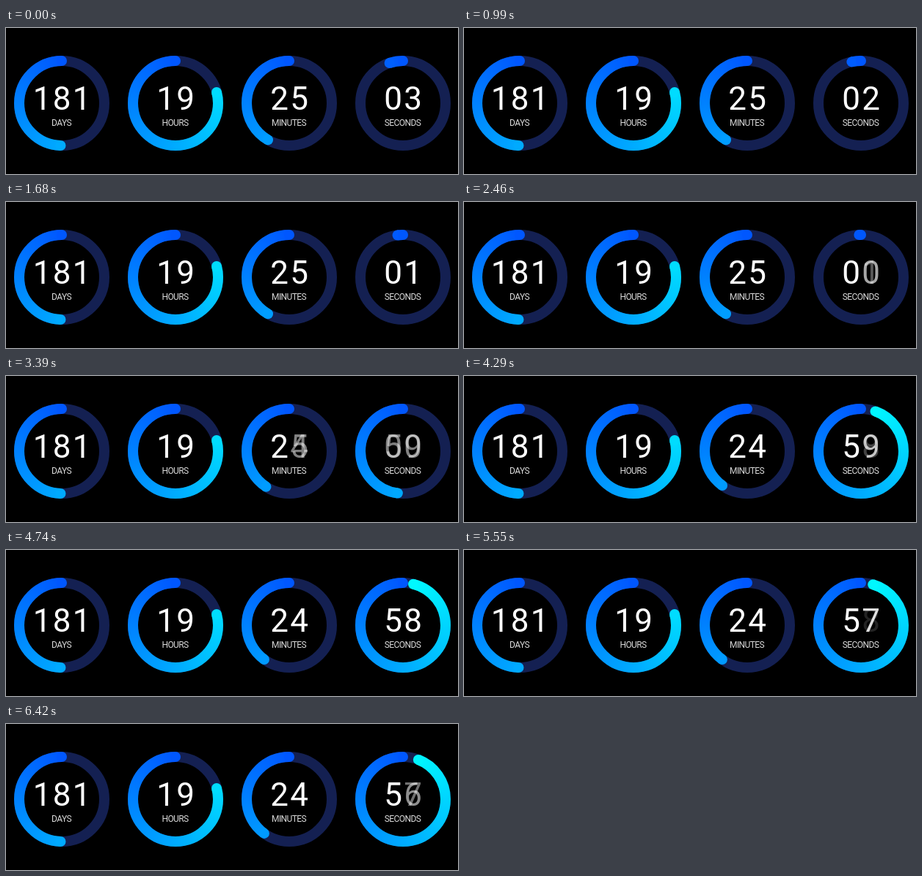
An HTML page with a canvas that plays this animation: 616 by 200 pixels, repeating every 6450 ms.

```html
<!DOCTYPE html>
<html lang="en">
<head>
<meta charset="utf-8">
<title>Countdown</title>
<style>
  html, body { margin: 0; width: 100%; height: 100%; overflow: hidden; background: #000; }
  canvas { display: block; }
</style>
</head>
<body>
<canvas id="stage" width="616" height="200"></canvas>
<script>
const ctx = document.getElementById('stage').getContext('2d');

const LOOP = 6450;
const FIRST_TICK = 170;
const SECOND = 1000;
const START = 25 * 60 + 3;   // minutes and seconds left, in seconds
const CHASE = 3.03 / 1000;   // how fast an arc closes in on its value, per ms
const FADE_DELAY = 10;
const FADE = 430;

const CY = 103;
const RADIUS = 58;
const WIDTH = 14;
const CELL = 27;
const TOP = -Math.PI / 2;
const TAU = Math.PI * 2;

const rings = [
  { x: 76,  label: 'DAYS',    max: 365, pad: 3, value: () => 181 },
  { x: 231, label: 'HOURS',   max: 24,  pad: 2, value: () => 19 },
  { x: 386, label: 'MINUTES', max: 60,  pad: 2, value: n => Math.floor((START - n) / 60) },
  { x: 541, label: 'SECONDS', max: 60,  pad: 2, value: n => (START - n) % 60 }
];

const clamp = v => Math.max(0, Math.min(1, v));
const tickTime = n => FIRST_TICK + (n - 1) * SECOND;
const tickCount = t => Math.max(0, Math.floor((t - FIRST_TICK) / SECOND) + 1);

// Colour along the arc, 0 at the top and 1 after a full turn
const shade = p => `rgb(0, ${Math.round(87 + 168 * p)}, 255)`;

// Every tick adds its own decaying step, so late steps overlap smoothly
function arcLevel(ring, t) {
  let level = ring.value(-1);
  for (let n = 0; n <= tickCount(t); n++) {
    const step = ring.value(n) - ring.value(n - 1);
    level += step * (1 - Math.exp(-CHASE * (t - tickTime(n))));
  }
  return clamp(level / ring.max);
}

function dot(x, y, color) {
  ctx.fillStyle = color;
  ctx.beginPath();
  ctx.arc(x, y, WIDTH / 2, 0, TAU);
  ctx.fill();
}

function drawArc(x, level) {
  ctx.lineWidth = WIDTH;
  ctx.strokeStyle = '#142052';
  ctx.beginPath();
  ctx.arc(x, CY, RADIUS, 0, TAU);
  ctx.stroke();

  const end = TOP - level * TAU;
  const gradient = ctx.createConicGradient(TOP, x, CY);
  gradient.addColorStop(0, shade(1));
  gradient.addColorStop(1, shade(0));
  ctx.strokeStyle = gradient;
  ctx.beginPath();
  ctx.arc(x, CY, RADIUS, TOP, end, true);
  ctx.stroke();

  dot(x + RADIUS * Math.cos(end), CY + RADIUS * Math.sin(end), shade(level));
  dot(x, CY - RADIUS, shade(0));
}

function drawDigit(char, x, alpha) {
  ctx.globalAlpha = alpha;
  ctx.fillText(char, x, 111.5);
  ctx.globalAlpha = 1;
}

function drawDigits(ring, n, mix) {
  const text = k => String(ring.value(k)).padStart(ring.pad, '0');
  const now = text(n);
  const before = text(Math.max(0, n - 1));
  ctx.font = '400 44px Roboto, sans-serif';
  ctx.letterSpacing = '0px';
  ctx.fillStyle = '#fff';
  for (let i = 0; i < now.length; i++) {
    const x = ring.x + (i - (now.length - 1) / 2) * CELL;
    if (now[i] === before[i]) {
      drawDigit(now[i], x, 1);
    } else {
      drawDigit(before[i], x, 1 - mix);
      drawDigit(now[i], x, mix);
    }
  }
}

function drawLabel(ring) {
  ctx.font = '400 12px Roboto, sans-serif';
  ctx.letterSpacing = '-0.6px';
  ctx.fillStyle = '#d8d8d8';
  ctx.fillText(ring.label, ring.x - 0.5, 134);
}

function draw(t) {
  ctx.fillStyle = '#000';
  ctx.fillRect(0, 0, 616, 200);
  ctx.textAlign = 'center';
  ctx.textBaseline = 'alphabetic';
  const n = tickCount(t);
  const mix = clamp((t - tickTime(n) - FADE_DELAY) / FADE);
  for (const ring of rings) {
    drawArc(ring.x, arcLevel(ring, t));
    drawDigits(ring, n, mix);
    drawLabel(ring);
  }
}

const origin = performance.now();
function frame() {
  draw((performance.now() - origin) % LOOP);
  requestAnimationFrame(frame);
}
frame();
</script>
</body>
</html>
```
